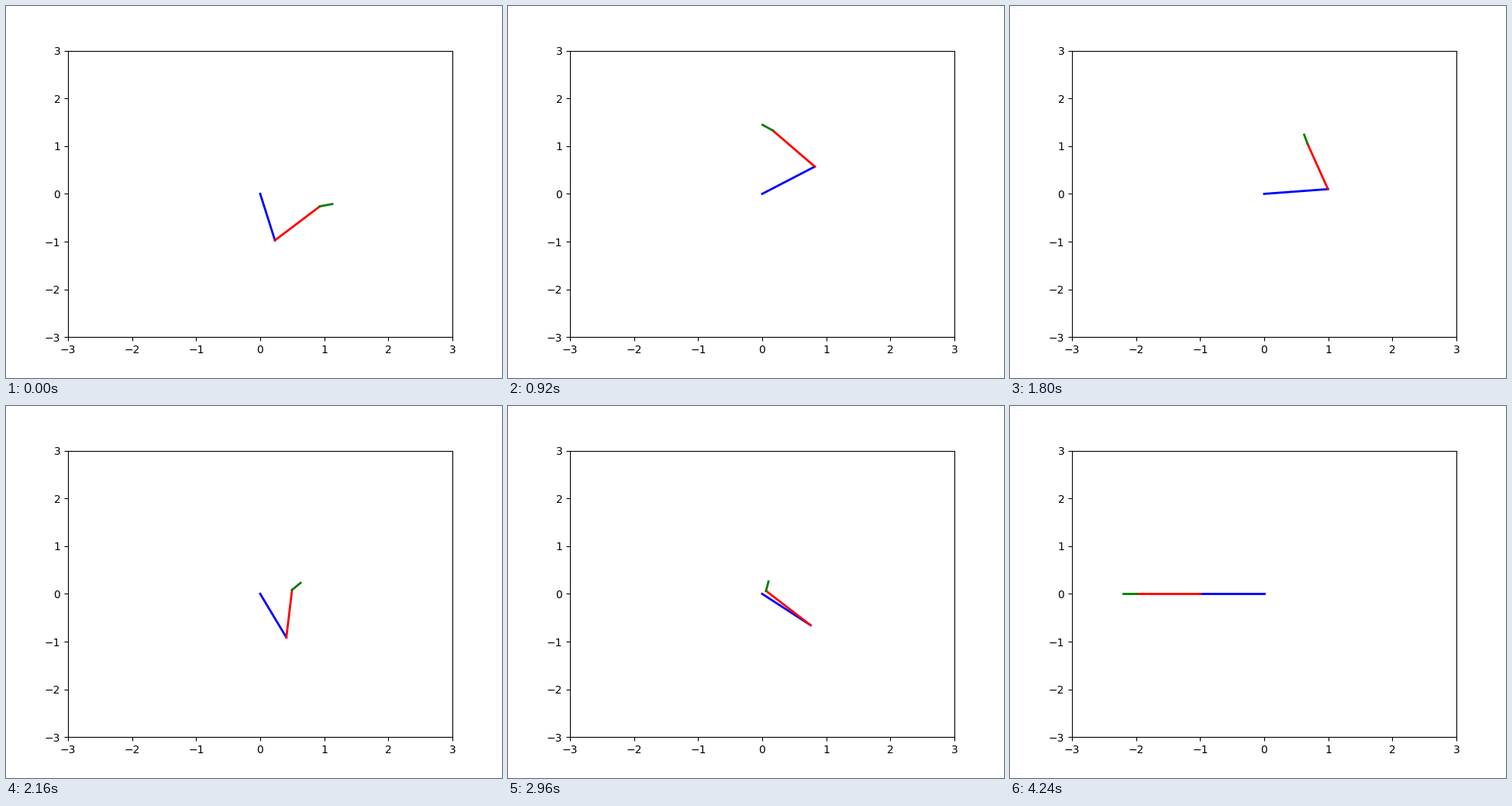
A matplotlib script that plays this animation: 640 px wide and 480 px high, repeating every 5.06 s.

```python
import numpy as np
import matplotlib.pyplot as plt
from matplotlib.animation import FuncAnimation

STEP = 20            # ms per drawn frame
LOOP = 5060          # ms per loop
POSE = 40            # ms per pose
SNAP = 4240          # ms at which the arm snaps out straight
LENGTHS = (1, 1, 0.2)
COLORS = ("blue", "red", "green")

# key poses: index, then degrees of upper arm, forearm and hand
REST = (-76.7, 45.4, 14)
KEYS = np.array([
    (0, *REST),
    (14, -76, 48, 16),
    (23, 34.8, 130.9, 143.5),    # swing up
    (28, 50, 127, 138),
    (36, 52.1, 90, 102.6),       # reach
    (42, 27, 111, 113),
    (54, -65.9, 84.9, 48),       # swing down
    (61, -86, 55, 20),
    (74, -41, 134, 79),          # fold
    (90, -66.2, 100.8, 56),      # settle
])
TIMES, ANGLES = KEYS[:, 0], KEYS[:, 1:]


def tangents(t, v):
    """Monotone tangents, so the curve never overshoots its keys."""
    slope = np.diff(v, axis=0) / np.diff(t)[:, None]
    a, b = slope[:-1], slope[1:]
    same = a * b > 0
    inner = np.where(same, 2 * a * b / np.where(same, a + b, 1), 0)
    still = np.zeros((1, v.shape[1]))
    return np.vstack([slope[:1], inner, still])


TANGENTS = tangents(TIMES, ANGLES)


def pose(k):
    k = min(k, TIMES[-1])
    i = min(np.searchsorted(TIMES, k, side="right") - 1, len(TIMES) - 2)
    h = TIMES[i + 1] - TIMES[i]
    s = (k - TIMES[i]) / h
    ease = s * s * (3 - 2 * s)
    bend = (1 - s) * TANGENTS[i] - s * TANGENTS[i + 1]
    return ANGLES[i] * (1 - ease) + ANGLES[i + 1] * ease + h * s * (1 - s) * bend


fig, ax = plt.subplots(figsize=(6.4, 4.8), dpi=100)
ax.set_xlim(-3, 3)
ax.set_ylim(-3, 3)
links = [ax.plot([], [], color=c, lw=2)[0] for c in COLORS]


def update(frame):
    ms = frame * STEP
    angles = np.radians(pose(ms // POSE)) if ms < SNAP else [np.pi] * 3
    x = y = 0
    for link, length, angle in zip(links, LENGTHS, angles):
        x2, y2 = x + length * np.cos(angle), y + length * np.sin(angle)
        link.set_data([x, x2], [y, y2])
        x, y = x2, y2
    return links


anim = FuncAnimation(fig, update, frames=LOOP // STEP, interval=STEP,
                     repeat=True, repeat_delay=0)
plt.show()
```
